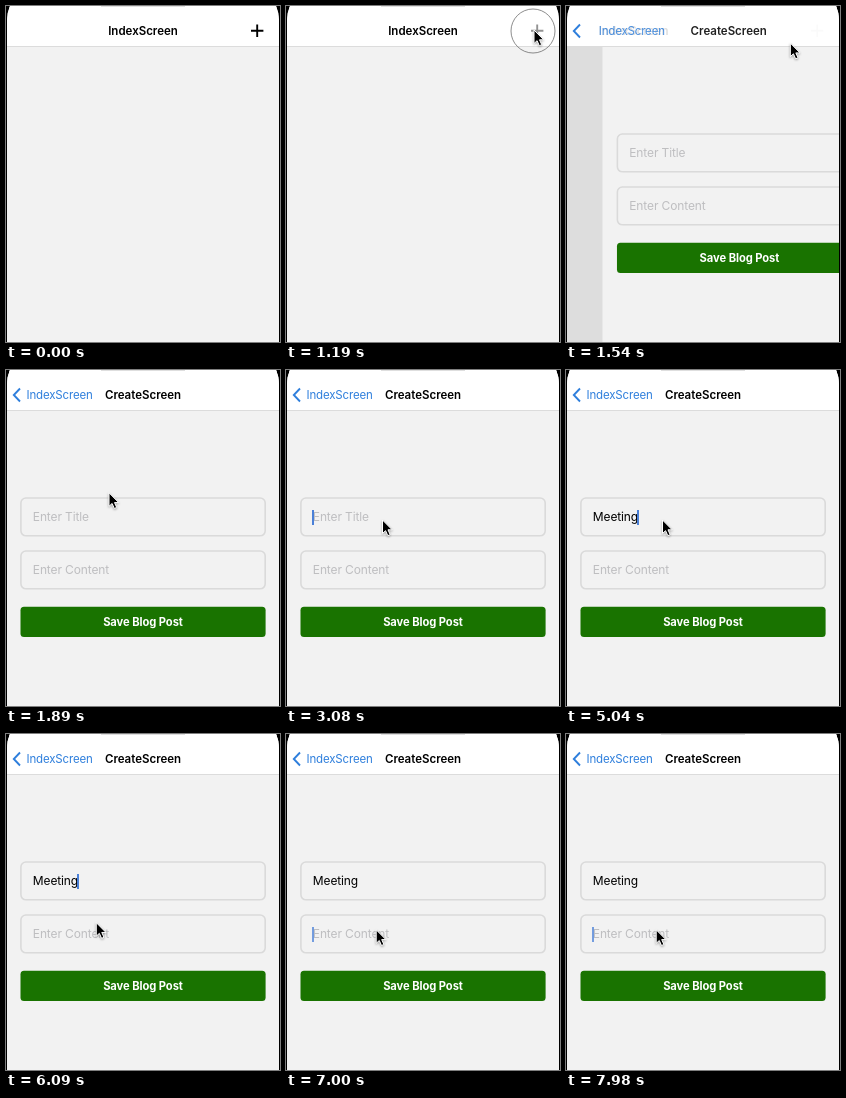
Write an HTML page that moves like this. It is 274x336 px and loops after 8 s.

```html
<!DOCTYPE html>
<html lang="en">
<head>
<meta charset="utf-8">
<title>Create screen</title>
<style>
  html, body { margin: 0; width: 100%; height: 100%; overflow: hidden; background: #000; }
  body { position: relative; font: 12px/20px Inter, "Liberation Sans", sans-serif; color: #000; }
  div, svg { position: absolute; box-sizing: border-box; white-space: nowrap; }
  svg { left: 0; top: 0; }
  #stage { left: 0; top: 0; width: 274px; height: 336px; overflow: hidden; }
  #phone { inset: 0; background: #f2f2f2; clip-path: inset(-20px 1px -40px 1px round 34px); }
  #dim { inset: 0; background: #000; }
  #form { left: 0; top: 0; width: 274px; height: 336px; background: #f2f2f2; }
  .field { fill: none; stroke: #dadada; stroke-width: 1.6; }
  .text { left: 26.8px; letter-spacing: -.12px; }
  .hint { color: #bebec0; }
  .caret { left: 26px; width: 2px; height: 15px; background: #4a80d8; }
  #save { left: 0; top: 237px; width: 274px; color: #fff; font-weight: 700; font-size: 11.2px;
    line-height: 30px; letter-spacing: -.08px; text-align: center; }
  #header { left: 0; top: 0; width: 274px; height: 41px; background: #fff; border-bottom: 1px solid #dcdcdc; }
  #notch { left: 95px; top: 0; width: 84px; height: 1px; background: #dedede; }
  .title { left: 0; top: 14.5px; width: 274px; text-align: center; font-weight: 600; font-size: 11.5px; }
  #back { left: 20.5px; top: 14.5px; font-size: 11.5px; letter-spacing: -.17px; color: #2f7fdc; }
  #header svg { fill: none; stroke-width: 1.9; }
  #ring { left: -23px; top: -21.5px; width: 45px; height: 45px; border: 1px solid #555; border-radius: 50%; }
  #mouse { left: 0; top: 0; }
  #mouse svg { left: -2px; top: -2px; filter: drop-shadow(0 1px 1px #0005); }
</style>
</head>
<body>
<div id="stage">
  <div id="phone">
    <div id="dim"></div>
    <div id="form">
      <svg width="274" height="336">
        <rect class="field" x="14.9" y="128" width="244.3" height="37.8" rx="5"/>
        <rect class="field" x="14.9" y="181" width="244.3" height="37.8" rx="5"/>
        <rect x="14.5" y="236.8" width="245.1" height="30.2" rx="3.5" fill="#197300"/>
      </svg>
      <div class="text hint" id="hint" style="top:137px">Enter Title</div>
      <div class="text" id="typed" style="top:137px"></div>
      <div class="text hint" style="top:190px">Enter Content</div>
      <div class="caret" id="titleCaret" style="top:139.5px"></div>
      <div class="caret" id="contentCaret" style="top:192.5px"></div>
      <div id="save">Save Blog Post</div>
    </div>
    <div id="header">
      <div id="notch"></div>
      <div class="title" id="index">IndexScreen</div>
      <div class="title" id="create">CreateScreen</div>
      <div id="back">IndexScreen</div>
      <svg width="274" height="40">
        <path id="chevron" d="M14 18.5 7.8 25 14 31.5" stroke="#2f7fdc"/>
        <path id="plus" d="M245 24.7h12.4M251.2 18.5v12.4" stroke="#000"/>
      </svg>
    </div>
  </div>
  <div id="mouse">
    <div id="ring"></div>
    <svg width="16" height="22" viewBox="-2 -2 16 22">
      <path d="M.5 .5V14L3.6 11.2 5.8 16.2 8.2 15.2 6 10.3H10.2Z" stroke="#fff" stroke-linejoin="round"/>
    </svg>
  </div>
</div>
<script>
const LOOP = 8000, TICK = 70;
const PUSH = { start: 1365, length: 500 };
const TYPE = { start: 3570, perKey: 245, word: 'Meeting' };
const FOCUS_TITLE = 2660, FOCUS_CONTENT = 6440;
const CLICKS = [1050, 2240, 6230];
const MOVES = [
  { start: 420, length: 490, x: 247.5, y: 23.5 },
  { start: 1400, length: 700, x: 96, y: 149.5 },
  { start: 5460, length: 840, x: 89.7, y: 195.3 }
];

const $ = id => document.getElementById(id);
const clamp = v => Math.min(1, Math.max(0, v));
const smooth = u => { u = clamp(u); return u * u * (3 - 2 * u); };

// cubic-bezier(.2833, .99, .3183, .99), solved by bisection
function pushEase(x) {
  if (x <= 0 || x >= 1) return clamp(x);
  const curve = (s, a, b) => 3 * (1 - s) * (1 - s) * s * a + 3 * (1 - s) * s * s * b + s ** 3;
  let lo = 0, hi = 1;
  for (let i = 0; i < 24; i++) {
    const mid = (lo + hi) / 2;
    if (curve(mid, .2833, .3183) < x) lo = mid; else hi = mid;
  }
  return curve(lo, .99, .99);
}

// The sideways part of each move settles before the vertical part.
function pointer(t) {
  let x = 275, y = -16;
  for (const m of MOVES) {
    const u = (t - m.start) / m.length;
    x += (m.x - x) * smooth(u / .8);
    y += (m.y - y) * smooth(u);
  }
  return { x, y };
}

function pulse(age) {
  return age < 0 || age >= 280 ? 0 : Math.sin(Math.PI * (age + 70) / 350);
}

// Caret opacity: quick fade in, hold, slower fade out
function blink(age) {
  const phase = age % 980;
  return age < 0 ? 0 : clamp(Math.min((phase + 70) / 210, 1 - (phase - 490) / 280));
}

function place(id, x, opacity) {
  $(id).style.transform = `translateX(${x}px)`;
  $(id).style.opacity = opacity;
}

function draw(t) {
  const p = pushEase((t - PUSH.start) / PUSH.length), rest = 1 - p;
  place('form', 274 * rest, 1);
  place('create', 193 * rest, p);
  place('index', -80 * p, rest);
  place('back', 92 * rest, p);
  $('dim').style.opacity = .1 * p;
  $('chevron').style.opacity = clamp(1.15 * p);
  $('plus').style.opacity = clamp(1 - 1.13 * p) * (1 - .6 * pulse(t - CLICKS[0]));

  const keys = t < TYPE.start ? 0 : 1 + Math.floor((t - TYPE.start) / TYPE.perKey);
  $('typed').textContent = TYPE.word.slice(0, keys);
  $('hint').style.opacity = keys ? 0 : 1;
  const titleOn = t >= FOCUS_CONTENT ? 0 : keys ? 1 : blink(t - FOCUS_TITLE);
  place('titleCaret', $('typed').offsetWidth, titleOn);
  place('contentCaret', 0, blink(t - FOCUS_CONTENT));

  const { x, y } = pointer(t);
  $('mouse').style.transform = `translate(${x}px, ${y}px)`;
  $('ring').style.opacity = .7 * Math.max(...CLICKS.map(c => pulse(t - c)));
}

function frame() {
  const t = performance.now() % LOOP;
  draw(Math.floor(t / TICK) * TICK);
  requestAnimationFrame(frame);
}
frame();
</script>
</body>
</html>
```
